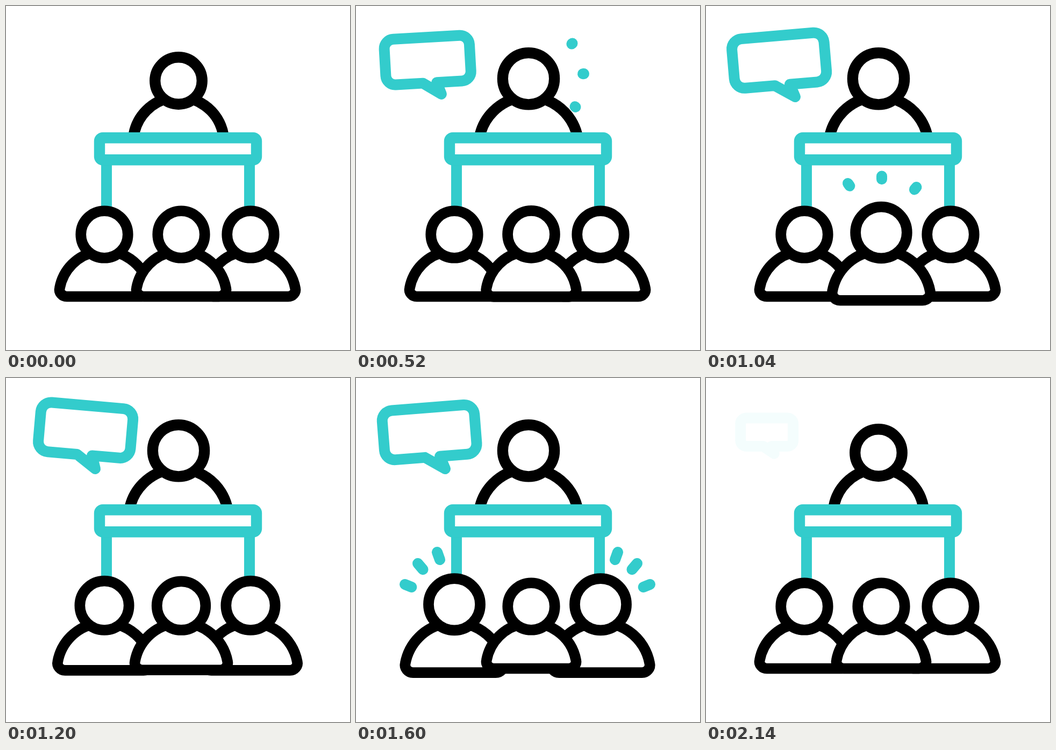
An HTML page with a canvas that plays this animation: 640 by 640 pixels, repeating every 2660 ms.

```html
<!DOCTYPE html>
<html>
<head>
<meta charset="utf-8">
<style>
  html, body { margin: 0; height: 100%; overflow: hidden; background: #fff; }
  canvas { display: block; }
</style>
</head>
<body>
<canvas id="stage" width="640" height="640"></canvas>
<script>
const c = document.getElementById('stage').getContext('2d');
const TEAL = '#33cccc', BLACK = '#000';
const LOOP = 2660, STEP = 20, FIRST = 140, LAST = 2140;

const ramp = (t, a, b) => Math.min(1, Math.max(0, (t - a) / (b - a)));
const ease = (t, a, b) => (1 - Math.cos(Math.PI * ramp(t, a, b))) / 2;
const pulse = (t, a, b, d, e) => ease(t, a, b) - ease(t, d, e);

// Rays as [inner x, inner y, outer x, outer y]
const speakerRays = [[383.5, 87.5, 402.5, 69.5], [390.5, 130, 424, 126], [390.5, 175, 408.5, 188]];
const middleRays = [[283, 357, 264, 330], [327, 349, 327, 316.5], [371, 362, 391.5, 337]];
const rightRays = [[478, 349, 487, 324], [506, 365, 523, 345], [525, 393, 547, 384]];
const leftRays = rightRays.map(([a, b, d, e]) => [638 - a, b, 638 - d, e]);

function paint(color, width, filled = true) {
  c.lineWidth = width;
  c.strokeStyle = color;
  c.fillStyle = '#fff';
  if (filled) c.fill();
  c.stroke();
}

// Scales the path around (x, y) while the line keeps its weight
function scaled(x, y, s, trace) {
  c.save();
  c.translate(x, y);
  c.scale(s, s);
  c.beginPath();
  trace();
  c.restore();
}

function person(x, y, grow, width) {
  const s = 1 + 0.1 * grow;
  scaled(x, y, s, () => {
    const a = Math.atan2(-15, 83.2);
    c.moveTo(-70, 77.5);
    c.lineTo(70, 77.5);
    c.bezierCurveTo(78.6, 77.5, 85, 69.8, 83.2, 62);
    c.arc(0, 77, 84.5, a, Math.PI - a, true);
    c.bezierCurveTo(-85, 69.8, -78.6, 77.5, -70, 77.5);
    c.closePath();
  });
  paint(BLACK, width);
  scaled(x, y, s, () => c.arc(0, -38, 43.75, 0, 7));
  paint(BLACK, width);
}

function lectern() {
  c.beginPath();
  for (const x of [187, 453]) {
    c.moveTo(x, 290);
    c.lineTo(x, 420);
  }
  paint(TEAL, 20, false);
  c.beginPath();
  c.roundRect(174, 245.2, 292, 41, 6);
  paint(TEAL, 20.4);
}

// Rays shoot outwards, then their inner ends catch up
function rays(list, t, start, mid, end) {
  if (t <= start || t >= end) return;
  const head = ramp(t, start, mid), tail = ramp(t, mid, end);
  c.beginPath();
  for (const [x, y, u, v] of list) {
    c.moveTo(x + (u - x) * tail, y + (v - y) * tail);
    c.lineTo(x + (u - x) * head, y + (v - y) * head);
  }
  paint(TEAL, 20, false);
}

function swing(t) {
  const k = Math.min(12, Math.max(0, (t - 338) / 142.6));
  const wave = Math.cos(Math.PI * k);
  return k < 1 || k > 11 ? 2.5 * (wave - 1) : 5 * wave;
}

function bubble(t) {
  const alpha = ramp(t, 140, 300) - ramp(t, 1960, 2150);
  if (alpha <= 0) return;
  scaled(75, 103, 0.57 + 0.43 * pulse(t, 160, 660, 1820, 2140), () => {
    c.translate(91, 66);
    c.rotate(swing(t) * Math.PI / 180);
    c.translate(-166, -169);
    c.moveTo(130, 145);
    c.arcTo(56, 145, 56, 53, 19);
    c.arcTo(56, 53, 228, 53, 19);
    c.arcTo(228, 53, 228, 145, 19);
    c.arcTo(228, 145, 158, 145, 19);
    c.lineTo(158, 145);
    c.lineTo(166, 169);
    c.closePath();
  });
  c.globalAlpha = alpha;
  paint(TEAL, 20);
  c.globalAlpha = 1;
}

function draw(now) {
  const t = Math.min(LAST, Math.max(FIRST, Math.floor(now % LOOP / STEP) * STEP));
  c.lineJoin = c.lineCap = 'round';
  c.fillStyle = '#fff';
  c.fillRect(0, 0, 640, 640);

  c.save();
  c.beginPath();
  c.rect(0, 0, 640, 236);
  c.clip();
  person(321, 177, pulse(t, 140, 420, 1730, 2100), 20.3);
  c.restore();
  lectern();

  const sides = pulse(t, 1030, 1400, 1570, 1940);
  person(183, 463, sides, 19.7);
  person(455, 463, sides, 19.7);
  person(326, 463, pulse(t, 470, 840, 980, 1350), 19.7);

  rays(speakerRays, t, 200, 360, 530);
  rays(middleRays, t, 740, 900, 1070);
  rays(leftRays, t, 1370, 1530, 1690);
  rays(rightRays, t, 1370, 1530, 1690);
  bubble(t);
}

const begin = performance.now();
function tick() {
  draw(performance.now() - begin);
  requestAnimationFrame(tick);
}
tick();
</script>
</body>
</html>
```
